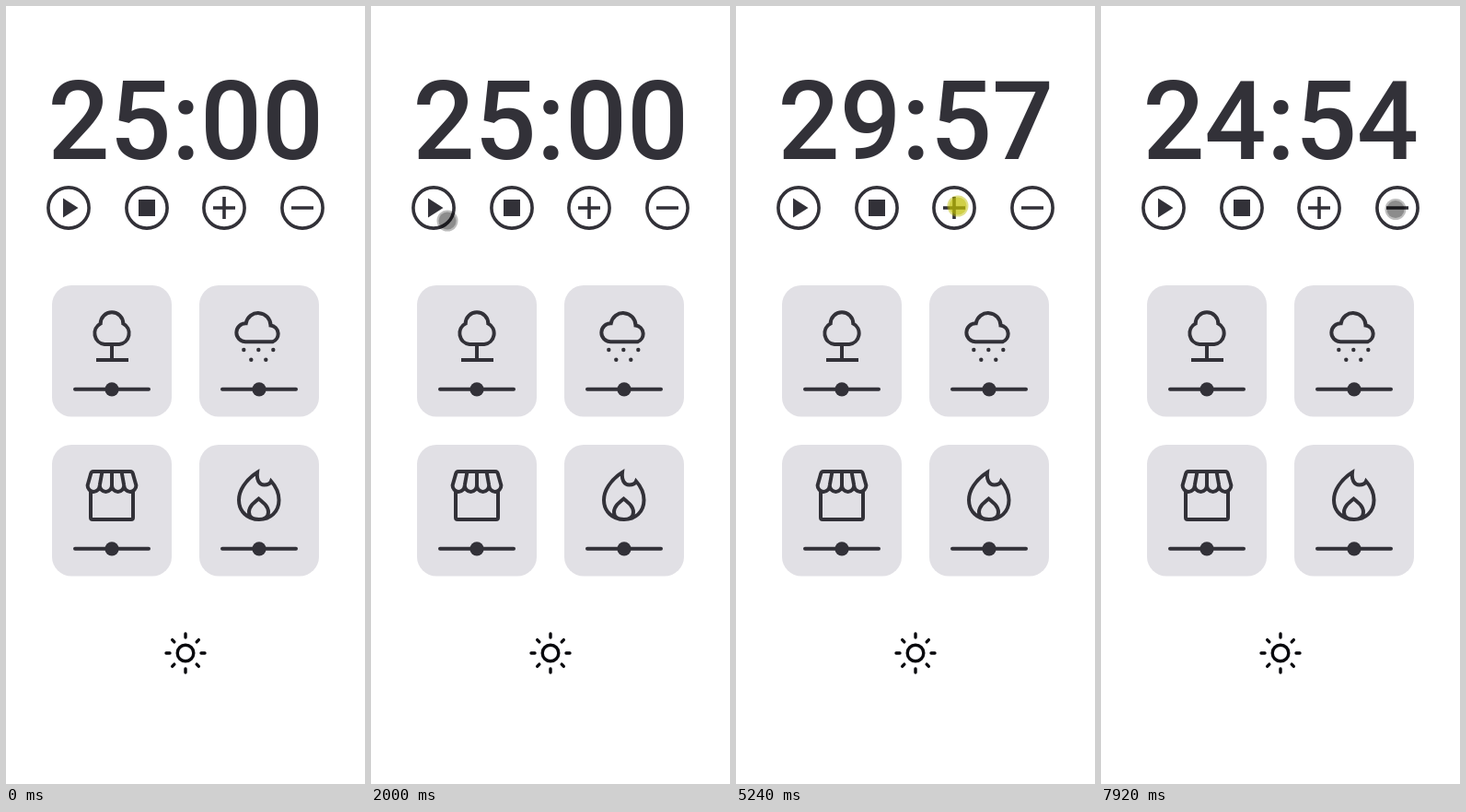
An HTML page for the animation above (8 s loop, 390 px wide and 844 px high).

```html
<!DOCTYPE html>
<html lang="en">
<head>
<meta charset="utf-8">
<title>Focus timer</title>
<style>
  html, body { margin: 0; width: 100%; height: 100%; overflow: hidden; background: #fff; }
  svg { display: block; width: 390px; height: 844px; }
  .clock { font: 500 118px Roboto, sans-serif; text-anchor: middle; fill: #323138; }
  .line { fill: none; stroke: #323138; stroke-width: 4; }
  .thin { stroke-width: 3.6; }
  .solid { fill: #323138; }
  .sun { fill: none; stroke: #08080c; stroke-width: 3.4; stroke-linecap: round; }
  #cursor { fill: rgba(0, 0, 0, .26); }
  #cursor.down { fill: rgba(190, 190, 0, .47); }
</style>
</head>
<body>
<svg viewBox="0 0 390 844">
  <defs>
    <g id="panel">
      <rect width="130" height="142.5" rx="21" fill="#e1e0e5"/>
      <path class="line" stroke-linecap="round" d="M25 112.8H105"/>
      <circle class="solid" cx="65" cy="112.8" r="7.6"/>
    </g>
    <circle id="ring" class="line thin" r="22.1"/>
    <circle id="dot" class="solid" r="2.2"/>
    <g id="rays">
      <path d="M0-21V-17M0 17V21"/>
      <path transform="rotate(45)" d="M0-20.3V-17.2M0 17.2V20.3"/>
    </g>
  </defs>

  <text id="clock" class="clock" x="195.3" y="166">25:00</text>

  <use href="#ring" x="68" y="219"/>
  <use href="#ring" x="153" y="219"/>
  <use href="#ring" x="237" y="219"/>
  <use href="#ring" x="322" y="219"/>
  <path class="solid" d="M62 208.5L78.5 219L62 229.5ZM144 210H162V228H144Z"/>
  <path class="line thin" d="M225 219H249M237 207V231M310 219H334"/>

  <use href="#panel" x="50" y="303"/>
  <use href="#panel" x="210" y="303"/>
  <use href="#panel" x="50" y="476"/>
  <use href="#panel" x="210" y="476"/>

  <g class="line">
    <!-- tree -->
    <path d="M107 367H123A12 12 0 0 0 127.3 344.5A12.3 12.3 0 0 0 102.7 344.5A12 12 0 0 0 107 367ZM115 367V384M98 384H133"/>
    <!-- cloud -->
    <path d="M260 364.300H289.500A9.200 9.200 0 0 0 287.500 346.500A13.500 13.500 0 0 0 260.700 344.300A10 10 0 0 0 260 364.300Z"/>
    <!-- shop -->
    <path stroke-linejoin="round" d="M95 505H135Q137.500 505 138 508L141.400 520a6.600 7 0 0 1-13.200 0a6.600 7 0 0 1-13.200 0a6.600 7 0 0 1-13.200 0a6.600 7 0 0 1-13.200 0L92 508Q92.500 505 95 505ZM104.500 505L101.800 520M115 505V520M125.500 505L128.200 520M92 526V555Q92 557 94 557H136Q138 557 138 555V526"/>
    <!-- fire -->
    <path d="M273 506C272 514 275 519.500 280.500 519.500C284 519.500 287 518 288 515.500C293 521 296.500 528 296.500 536C296.500 549 287 557 275 557C262 557 253 548 253 536C253 526 260 514 273 506ZM274.500 534.500C280 539 285 543 285 549C285 554 281 557 274.500 557C268 557 264 554 264 549C264 543 269 539 274.500 534.500Z"/>
  </g>
  <use href="#dot" x="258.3" y="373"/>
  <use href="#dot" x="274.3" y="373"/>
  <use href="#dot" x="290.3" y="373"/>
  <use href="#dot" x="266.3" y="383.7"/>
  <use href="#dot" x="282.3" y="383.7"/>

  <g class="sun" transform="translate(195 702)">
    <circle r="8.8"/>
    <use href="#rays"/>
    <use href="#rays" transform="rotate(90)"/>
  </g>

  <g id="cursor">
    <circle r="11.5"/>
    <circle r="9.5"/>
  </g>
</svg>
<script>
  const LOOP = 8000, STEP = 68;
  const FIRST_TICK = 2660, TICK = 1012;
  const PRESS = 140;
  const clock = document.getElementById("clock");
  const cursor = document.getElementById("cursor");

  const presses = [
    { at: 1540, add: 0 },
    { at: 4040, add: 300 },
    { at: 5240, add: 300 },
    { at: 6650, add: -300 },
    { at: 7780, add: -300 }
  ];

  // Each move follows a Bezier curve through its control points.
  const moves = [
    { start: 530, end: 1270, path: [[324, 813], [245, 407], [83, 239]] },
    { start: 1340, end: 1475, path: [[79, 232], [73, 219]] },
    { start: 2000, end: 2270, path: [[83, 233], [130, 300], [206, 310]] },
    { start: 2660, end: 3310, path: [[208, 304], [228, 231], [241, 217]] },
    { start: 5570, end: 6390, path: [[242, 225], [300, 442], [388, 194], [320, 220.5]] }
  ];

  const mix = (a, b, u) => a.map((v, i) => v + (b[i] - v) * u);

  function bezier(points, u) {
    if (points.length === 1) return points[0];
    return bezier(points.slice(1).map((p, i) => mix(points[i], p, u)), u);
  }

  function cursorAt(t) {
    const move = moves.findLast(m => t >= m.start);
    if (!move) return null;
    const elapsed = Math.floor((t - move.start) / STEP + 0.1) * STEP;
    return bezier(move.path, Math.min(1, elapsed / (move.end - move.start)));
  }

  function secondsAt(t) {
    const ticks = Math.max(0, Math.floor((t - FIRST_TICK) / TICK) + 1);
    return presses.reduce((sum, p) => t >= p.at + PRESS ? sum + p.add : sum, 1500 - ticks);
  }

  const pad = n => String(n).padStart(2, "0");

  function draw(now) {
    const t = now % LOOP;
    const seconds = secondsAt(t);
    clock.textContent = pad(Math.floor(seconds / 60)) + ":" + pad(seconds % 60);

    const place = cursorAt(t);
    cursor.style.display = place ? "" : "none";
    if (place) cursor.setAttribute("transform", `translate(${place})`);
    cursor.classList.toggle("down", presses.some(p => t >= p.at && t < p.at + PRESS));
    requestAnimationFrame(draw);
  }
  draw(performance.now());
</script>
</body>
</html>
```
